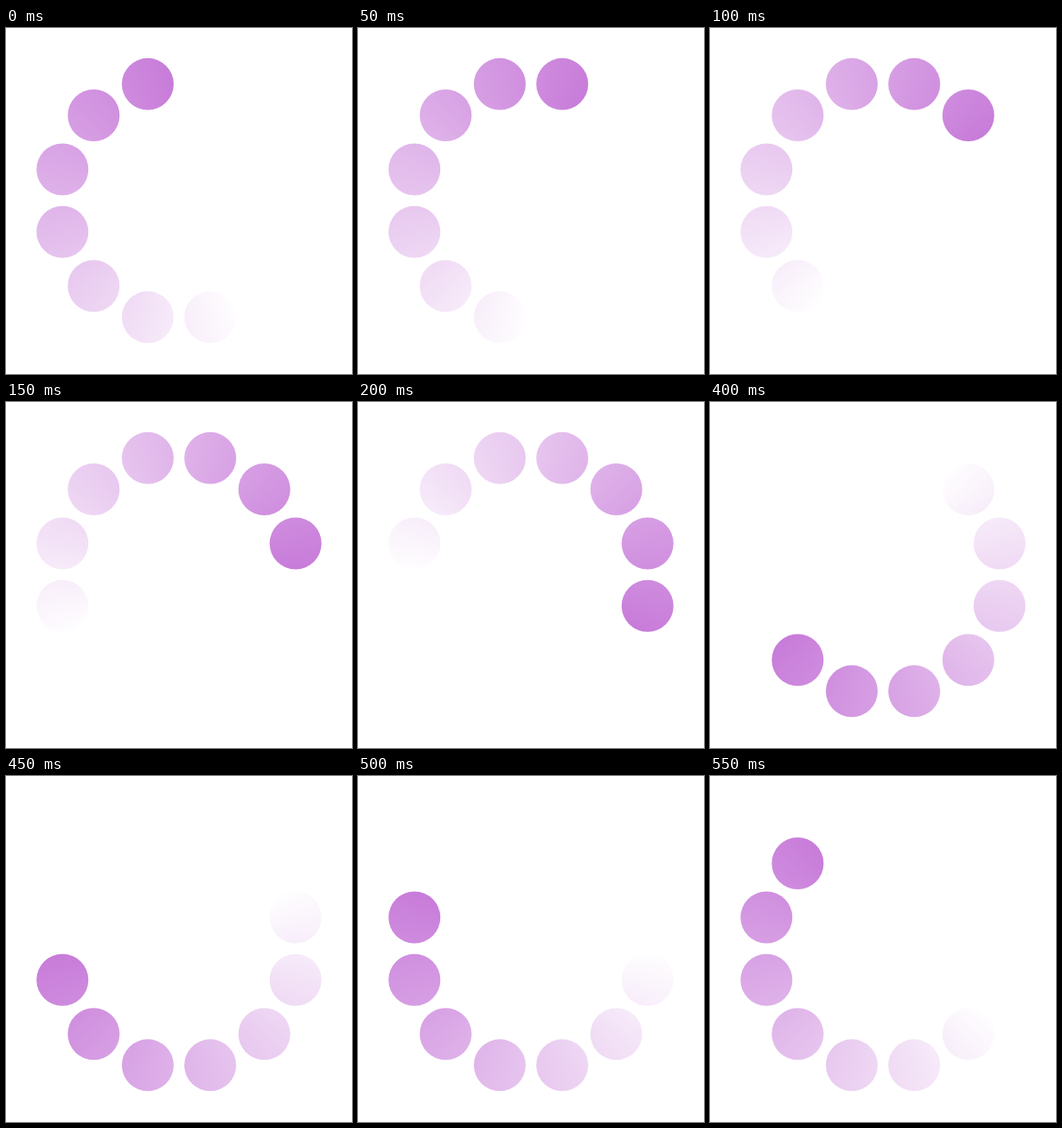
An HTML page with a canvas that plays this animation: 400x400 px, repeating every 600 ms.

```html
<!DOCTYPE html>
<html lang="en">
<head>
<meta charset="utf-8">
<title>Spinner</title>
<style>
  html, body { margin: 0; width: 100%; height: 100%; overflow: hidden; background: #fff; }
  canvas { display: block; width: 400px; height: 400px; }
</style>
</head>
<body>
<canvas id="stage" width="400" height="400"></canvas>
<script>
  const ctx = document.getElementById('stage').getContext('2d');
  const rad = degrees => degrees * Math.PI / 180;

  const CENTER = { x: 200, y: 199.6 };
  const RING = 139.5;
  const DOT = 30;
  const POSITIONS = 12;
  const VISIBLE = 7;
  const STEP_MS = 50;
  const STEP_ANGLE = 360 / POSITIONS;
  const SPAN = VISIBLE * STEP_ANGLE;

  // White at the tail's outer edge, full colour at the head's.
  function tailGradient(headAngle) {
    const start = headAngle + STEP_ANGLE / 2 - SPAN;
    const gradient = ctx.createConicGradient(rad(start), CENTER.x, CENTER.y);
    gradient.addColorStop(0, '#fff');
    gradient.addColorStop(SPAN / 360, '#c77ad9');
    gradient.addColorStop(1, '#c77ad9');
    return gradient;
  }

  function draw(time) {
    const step = Math.floor(time / STEP_MS) % POSITIONS;
    const head = -105 + step * STEP_ANGLE;

    ctx.fillStyle = '#fff';
    ctx.fillRect(0, 0, 400, 400);
    ctx.fillStyle = tailGradient(head);
    for (let i = 0; i < VISIBLE; i++) {
      const angle = rad(head - i * STEP_ANGLE);
      ctx.beginPath();
      ctx.arc(CENTER.x + RING * Math.cos(angle), CENTER.y + RING * Math.sin(angle), DOT, 0, 2 * Math.PI);
      ctx.fill();
    }
  }

  const startTime = performance.now();
  function tick() {
    draw(performance.now() - startTime);
    requestAnimationFrame(tick);
  }
  tick();
</script>
</body>
</html>
```
